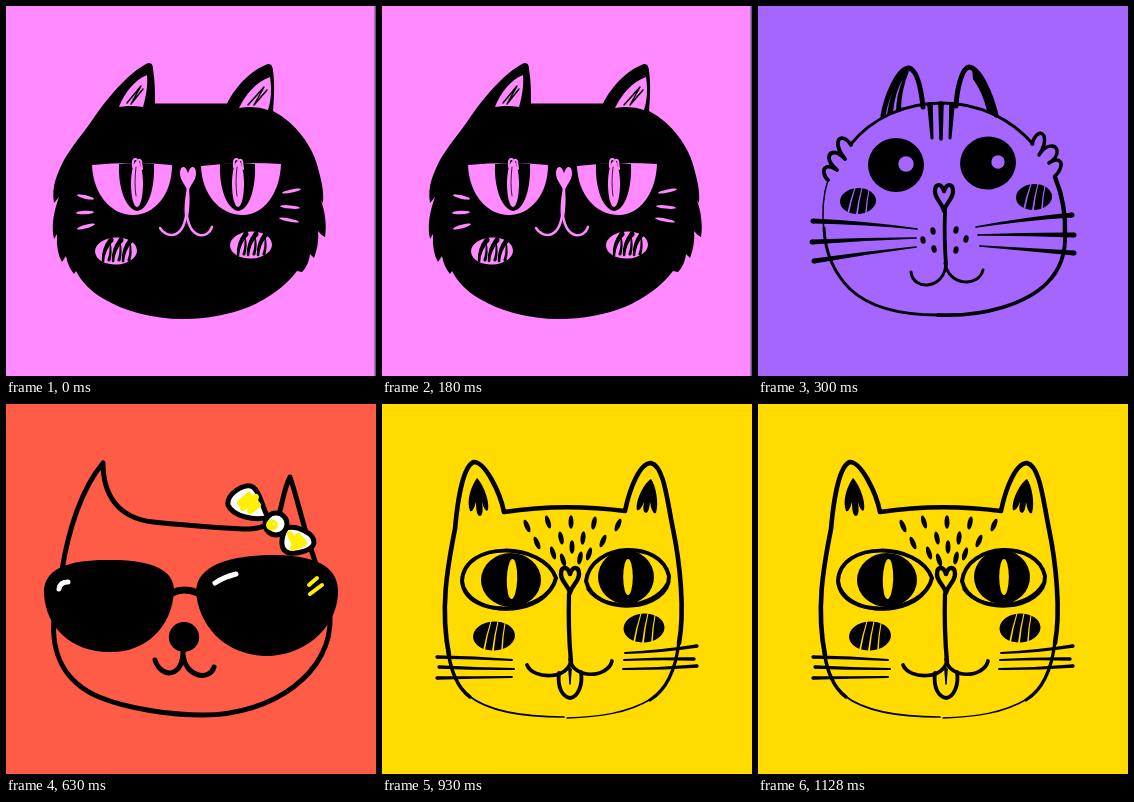
Animation of 370x370 px, one loop 1260 ms. Source, as an HTML page with a canvas:

```html
<!DOCTYPE html>
<html lang="en">
<head>
<meta charset="utf-8">
<title>Four cats</title>
<style>
html, body { margin: 0; width: 100%; height: 100%; overflow: hidden; }
canvas { display: block; width: 370px; height: 370px; }
</style>
</head>
<body>
<canvas id="stage"></canvas>
<script>
const SIZE = 370;
const INK = '#000';
const canvas = document.getElementById('stage');
const ctx = canvas.getContext('2d');
const ratio = window.devicePixelRatio || 1;
canvas.width = canvas.height = Math.round(SIZE * ratio);
ctx.scale(ratio, ratio);
ctx.lineCap = ctx.lineJoin = 'round';

function paper(color) {
  ctx.fillStyle = color;
  ctx.fillRect(0, 0, SIZE, SIZE);
}

function fill(d, color = INK) {
  ctx.fillStyle = color;
  ctx.fill(new Path2D(d));
}

function line(d, width = 4, color = INK) {
  ctx.strokeStyle = color;
  ctx.lineWidth = width;
  ctx.stroke(new Path2D(d));
}

function oval(x, y, rx, ry, color = INK, turn = 0) {
  ctx.fillStyle = color;
  ctx.beginPath();
  ctx.ellipse(x, y, rx, ry, turn, 0, Math.PI * 2);
  ctx.fill();
}

// Brush stroke that runs from width w0 to width w1 with a sideways bend.
function brush(x0, y0, x1, y1, w0, w1, color = INK, bend = 0) {
  const len = Math.hypot(x1 - x0, y1 - y0);
  const nx = -(y1 - y0) / len, ny = (x1 - x0) / len;
  const mx = (x0 + x1) / 2 + nx * bend * 2, my = (y0 + y1) / 2 + ny * bend * 2;
  const a = w0 / 2, b = w1 / 2, m = (a + b) / 2;
  ctx.fillStyle = color;
  ctx.beginPath();
  ctx.moveTo(x0 + nx * a, y0 + ny * a);
  ctx.quadraticCurveTo(mx + nx * m, my + ny * m, x1 + nx * b, y1 + ny * b);
  ctx.lineTo(x1 - nx * b, y1 - ny * b);
  ctx.quadraticCurveTo(mx - nx * m, my - ny * m, x0 - nx * a, y0 - ny * a);
  ctx.fill();
  oval(x0, y0, a, a, color);
  oval(x1, y1, b, b, color);
}

// Thin pointed mark.
function leaf(x0, y0, x1, y1, w, color = INK) {
  const len = Math.hypot(x1 - x0, y1 - y0);
  oval((x0 + x1) / 2, (y0 + y1) / 2, len / 2, w / 2, color, Math.atan2(y1 - y0, x1 - x0));
}

function heart(x, y, w, h) {
  const r = w / 2, top = y + h * 0.24;
  return `M${x} ${top} C${x - r * 0.3} ${y - h * 0.1} ${x - r} ${y - h * 0.06} ${x - r} ${top}
    C${x - r} ${y + h * 0.55} ${x - r * 0.25} ${y + h * 0.65} ${x} ${y + h}
    C${x + r * 0.25} ${y + h * 0.65} ${x + r} ${y + h * 0.55} ${x + r} ${top}
    C${x + r} ${y - h * 0.06} ${x + r * 0.3} ${y - h * 0.1} ${x} ${top}Z`;
}

function cheek(x, y, rx, ry, color) {
  oval(x, y, rx, ry, INK, -0.05);
  brush(x - 3, y - ry, x - 10, y + ry, 1, 1.8, color, 0.5);
  brush(x + 4, y - ry, x - 1, y + ry, 1, 1.8, color, 0.5);
  brush(x + 11, y - ry + 2, x + 8, y + ry - 1, 1, 1.5, color, 0.5);
}

function blackCat() {
  const pink = '#ff8aff';
  paper(pink);
  ctx.fillStyle = '#62577f';
  ctx.fillRect(368.5, 0, 1.5, SIZE);
  fill(`M85 116 C101 92 122 67 142 57 Q147 56 147 63 C149 75 149 86 149 97.5
    L221 97.5 C230 80 245 64 262 58 Q266 57 267 64 C269 80 268 93 267 105
    C290 117 308 141 313 166 C316 177 318 187 317 197 L315 194
    C319 206 321 219 319 231 Q315 229 312 225 C313 235 311 244 308 252
    L304 248 C303 256 300 262 296 266 L291 265
    C267 296 226 313 177 313 C146 313 118 305 98 293 C84 285 75 275 70 265
    L68 268 Q62 261 60 250 L56 256 Q50 246 51 228 L48 233
    C45 219 48 205 53 191 L48 197 C45 180 52 166 58 154 C66 140 75 130 85 116Z`);

  fill('M113 101 C118 88 128 74 141 69 C142 80 140 90 137 101 Q125 99 113 101Z', pink);
  fill('M233 102 C240 88 250 76 264 71 C266 84 265 95 262 104 Q249 99 233 102Z', pink);
  line('M121 97 L135 80 L125 98 L137 83', 1.5);
  line('M242 99 L258 81 L248 99 L261 84', 1.5);

  fill('M86 159 Q126 155 166 159 C166 189 148 209 127 209 C104 209 87 187 86 159Z', pink);
  fill('M195 160 Q235 155 275 158 C274 188 257 209 237 209 C213 209 196 188 195 160Z', pink);
  for (const x of [131, 232]) {
    fill(`M${x - 18} 158 Q${x} 156 ${x + 17} 158 C${x + 18} 183 ${x + 11} 204 ${x} 205
      C${x - 11} 203 ${x - 19} 183 ${x - 18} 158Z`);
    oval(x, 178, 6, 23, pink);
    line(`M${x - 4} 161 Q${x - 5} 152 ${x - 1} 153 Q${x + 2} 155 ${x + 2} 160
      M${x} 160 Q${x + 1} 151 ${x + 4} 155 L${x + 5} 163`, 2, pink);
    line(`M${x - 1} 161 Q${x - 3} 178 ${x - 1} 190`, 0.8);
  }

  fill(heart(182, 161, 16, 26), pink);
  line('M182 183 Q179 199 180 210 C176 234 160 232 154 222', 2.5, pink);
  line('M182 185 Q183 199 181 210 C185 234 202 233 206 221', 2.5, pink);

  leaf(71, 189, 88, 193, 3.5, pink);
  leaf(70, 207, 88, 206, 3.5, pink);
  leaf(71, 223, 89, 218, 3.5, pink);
  leaf(276, 187, 295, 183, 3.2, pink);
  leaf(274, 200, 294, 202, 3.2, pink);
  leaf(273, 212, 293, 216, 3.2, pink);

  for (const [x, y] of [[110, 245], [245, 239]]) {
    oval(x, y, 21, 13.5, pink, -0.04);
    for (const dx of [-8, 2, 12]) {
      brush(x + dx + 3, y - 11, x + dx - 5, y + 10, 5, 2.5, INK, 2);
      brush(x + dx + 2, y - 8, x + dx + 1, y + 9, 1.5, 3, INK, -1);
    }
  }
}

function whiskerCat() {
  const violet = '#a566ff';
  paper(violet);
  line('M93 138 C114 112 147 97 184 97 C221 97 253 113 275 138', 3);
  line('M70 174 C64 192 64 209 66 226', 1.5);
  line('M66 222 C67 246 76 267 92 283 C113 303 146 309 180 309', 3);
  line('M180 309 C228 311 269 297 289 277 C304 262 308 243 307 226', 3.8);
  line('M307 230 C308 207 304 188 297 171', 4.5);

  line('M93 139 C88 131 81 130 80 136 C79 142 83 148 87 153 C79 144 71 145 71 152 C71 157 76 161 79 164 C70 158 65 161 66 167 Q67 172 70 174', 3.8);
  line('M274 138 C277 128 283 124 286 130 C288 136 285 143 281 149 C288 138 297 138 299 144 C300 149 296 154 291 157 C299 151 304 155 303 160 Q301 167 297 170', 3.5);

  line('M125 110 C128 91 140 62 151 62 C159 64 163 82 165 101', 5);
  line('M198 100 C199 82 204 62 211 61 C222 62 233 89 238 109', 5);
  fill('M146 64 Q133 80 129 109 L135 106 Q137 86 145 73 Q138 89 138 107 L143 104 Q143 85 151 65Z');
  fill('M214 63 Q228 74 236 109 L229 105 Q225 87 215 73Z');

  brush(172, 99, 174, 132, 5.5, 3);
  brush(183, 98, 183, 133, 5.5, 3.5);
  brush(194, 99, 192, 132, 5.5, 3);

  oval(138, 159, 28, 27);
  oval(148, 158, 7.7, 7.7, violet);
  oval(230, 157, 28, 26.5, INK, -0.2);
  oval(240, 156, 6.7, 6.7, violet);

  cheek(100, 195, 18, 13, violet);
  cheek(276, 191, 18, 13, violet);

  line(heart(186, 179, 18, 26), 4.2);
  line('M187 205 Q186 233 188 259', 3.8);
  line('M188 257 C187 284 155 285 153 266', 3);
  line('M187 257 C191 281 221 281 225 264', 3);
  const dots = [[175, 225], [165, 234], [176, 243], [198, 224], [208, 233], [198, 244]];
  for (const [x, y] of dots) oval(x, y, 2.6, 3.8, INK, x < 187 ? -0.2 : 0.2);

  brush(55, 215, 159, 223, 5, 1.7, INK, -1.2);
  brush(54, 236, 158, 232, 5, 1.7, INK, -0.5);
  brush(56, 255, 158, 241, 5, 1.7, INK, -0.5);
  brush(314, 209, 218, 221, 5, 1.7, INK, 1);
  brush(316, 229, 220, 229, 5, 1.7, INK, 0.5);
  brush(316, 247, 222, 240, 5, 1.7);
}

function shadesCat() {
  const yellow = '#fff000', white = '#fff';
  paper('#ff5c47');
  line('M56 166 C62 128 75 85 97 59 C97 91 112 114 147 118 C178 121 220 125 244 125 Q268 123 274 107 C277 95 279 82 284 73 C291 93 298 126 310 160', 5);
  line('M48 214 C45 249 58 278 93 293 C122 305 165 311 197 311 C266 311 327 269 324 212', 5);

  fill('M38 190 C37 165 61 156 101 156 C143 155 169 165 168 187 C166 225 138 248 106 248 C66 249 40 224 38 190Z');
  fill('M190 187 C191 161 224 151 270 151 C315 152 333 165 332 190 C330 227 295 253 258 252 C217 250 192 220 190 187Z');
  line('M166 189 Q178 183 192 189', 7);
  line('M53 185 Q54 178 62 178', 5, white);
  line('M209 179 Q218 173 230 170', 5, white);
  line('M303 181 L311 174 M304 190 L316 181', 4, yellow);

  oval(178, 233, 15.2, 15);
  line('M177 246 C178 274 155 275 149 256 M177 250 C179 274 204 277 208 263', 5);

  const wings = [
    'M222 101 C220 90 239 78 247 83 C255 89 256 104 262 113 C250 117 227 113 222 101Z',
    'M280 124 C292 121 309 130 308 139 C306 147 291 150 283 149 C273 146 275 134 280 124Z'
  ];
  for (const wing of wings) {
    fill(wing, white);
    line(wing, 5);
  }
  line('M234 99 L243 91 L237 104 L250 93 L244 107 L252 101', 6, yellow);
  line('M284 130 L288 139 L292 132 L298 139 L287 144', 6, yellow);
  const knot = 'M259 120 a11 11 0 1 1 22 0 a11 11 0 1 1 -22 0Z';
  fill(knot, white);
  line(knot, 5);
  oval(266, 121, 6, 5.5, yellow);
  oval(268, 120, 1, 1, white);
}

function tongueCat() {
  const gold = '#ffdb00';
  paper(gold);
  line('M67 251 C58 206 65 165 73 125 C76 91 82 61 92 58 C103 58 118 88 122 108 Q181 99 243 107 C248 83 258 59 269 59 C282 62 285 96 291 125 C298 159 303 207 297 239', 4.6);
  line('M66 246 C69 270 76 284 88 293', 3.5);
  line('M87 292 C105 306 138 313 182 313', 1.7);
  line('M297 237 C294 265 284 286 268 296', 3.2);
  line('M269 295 C246 309 217 313 185 314', 1.5);

  fill('M95 74 C89 82 84 97 88 107 Q91 109 94 98 Q94 112 98 112 Q102 111 100 98 Q103 109 106 106 C108 97 101 80 95 74Z');
  fill('M269 75 C261 80 253 98 255 106 Q258 108 262 98 Q260 109 264 109 Q267 109 268 98 Q270 111 274 109 C277 99 274 82 269 75Z');

  const freckles = [
    [145, 122, -0.4], [166, 118, -0.3], [189, 118, 0], [212, 119, 0.2], [236, 121, 0.4],
    [155, 139, -0.4], [179, 134, -0.2], [201, 134, 0.1], [221, 137, 0.4],
    [171, 149, -0.3], [190, 143, 0], [207, 150, 0.3], [181, 156, -0.3], [198, 154, 0.2]
  ];
  for (const [x, y, turn] of freckles) oval(x, y, 2.5, 6.7, INK, turn);

  line('M80 177 C82 136 161 138 174 174 C166 211 84 217 80 177Z', 4);
  line('M82 184 C96 212 151 212 168 186', 3.2);
  oval(129, 176, 30, 27);
  oval(130, 175, 5.2, 20, gold, 0.03);
  line('M204 177 C209 138 279 135 287 172 C288 208 212 213 204 177Z', 4);
  line('M206 185 C222 208 271 205 285 180', 3.2);
  oval(244, 173, 28, 27);
  oval(246, 173, 4.8, 18, gold);

  line(heart(188, 164, 18, 25), 4.4);
  line('M187 190 Q186 226 189 258', 4.3);
  line('M189 255 C188 276 151 276 145 261', 3.7);
  line('M188 255 C191 276 226 274 230 257', 3.7);
  line('M177 269 C175 284 181 293 188 294 C196 293 201 281 199 268', 3.8);
  brush(188, 265, 188, 280, 3.5, 1.5);

  cheek(112, 232, 21, 14.5, gold);
  cheek(262, 224, 20.5, 14.5, gold);

  brush(55, 253, 130, 256, 3.3, 2, INK, -0.5);
  brush(57, 263, 132, 265, 3.3, 2, INK, 0.5);
  brush(55, 274, 130, 273, 3.3, 2);
  brush(315, 242, 243, 249, 3.3, 2, INK, -1);
  brush(312, 255, 242, 256, 3.3, 2, INK, 0.6);
  brush(315, 262, 241, 265, 3.3, 2, INK, -0.8);
}

const scenes = [
  [300, blackCat],
  [630, whiskerCat],
  [930, shadesCat],
  [1260, tongueCat]
];
const LOOP = 1260;
const start = performance.now();
let shown = null;

function tick() {
  const t = (performance.now() - start) % LOOP;
  const scene = scenes.find(([end]) => t < end)[1];
  if (scene !== shown) {
    scene();
    shown = scene;
  }
  requestAnimationFrame(tick);
}
tick();
</script>
</body>
</html>
```
